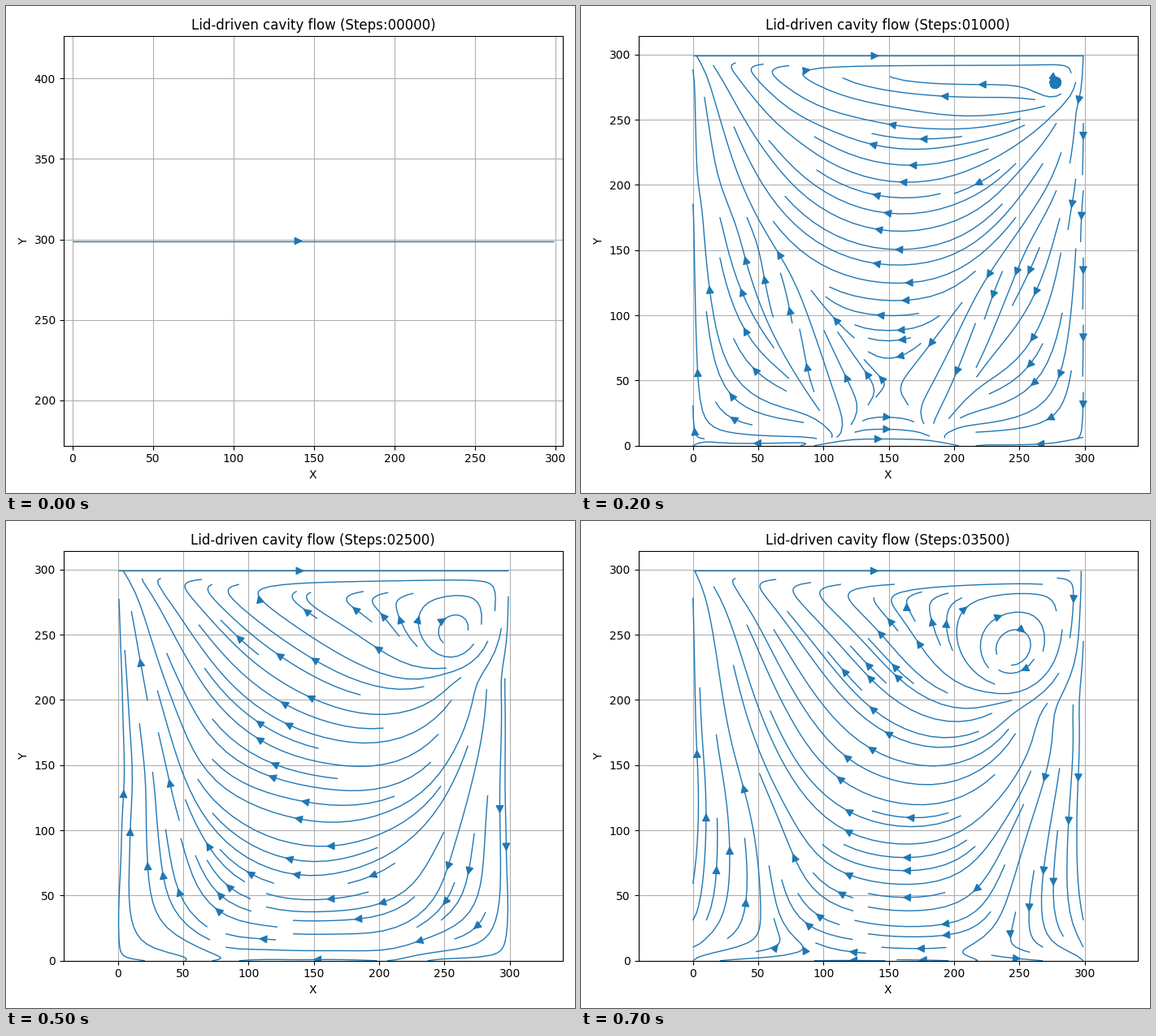
These frames come from a looping animation (700 px wide and 600 px high, 0.8 s). A matplotlib script:

```python
import numpy as np
import matplotlib.pyplot as plt
from matplotlib.animation import FuncAnimation

# Lattice Boltzmann (D2Q9) cavity, solved on a coarser grid than it is plotted
SIZE = 300
N = 240
LID_SPEED = 0.2
REYNOLDS = 2000
FRAMES = 8
STEPS_PER_FRAME = 500

CX = (0, 1, 0, -1, 0, 1, -1, -1, 1)
CY = (0, 0, 1, 0, -1, 1, 1, -1, -1)
W = (4 / 9,) + (1 / 9,) * 4 + (1 / 36,) * 4
OPPOSITE = (0, 3, 4, 1, 2, 7, 8, 5, 6)
OMEGA = 1 / (3 * LID_SPEED * N / REYNOLDS + 0.5)


def moments(f):
    rho = f.sum(axis=0)
    rising, falling = f[5] - f[7], f[8] - f[6]
    u = (f[1] - f[3] + rising + falling) / rho
    v = (f[2] - f[4] + rising - falling) / rho
    return rho, u, v


def collide(f):
    rho, u, v = moments(f)
    base = 1 - 1.5 * (u * u + v * v)
    post = f * (1 - OMEGA)
    rho *= OMEGA
    post[0] += W[0] * rho * base
    for i, along in ((1, u), (2, v), (5, u + v), (6, v - u)):
        cu = 3 * along
        weight = W[i] * rho
        even = weight * (base + 0.5 * cu * cu)
        odd = weight * cu
        post[i] += even + odd
        post[OPPOSITE[i]] += even - odd
    return post


def stream(post, f):
    f[0] = post[0]
    for i in range(1, 9):
        f[i] = np.roll(post[i], (CY[i], CX[i]), axis=(0, 1))
    # half-way bounce-back, with the lid dragging along x
    for i in (2, 5, 6):
        f[i, 0] = post[OPPOSITE[i], 0]
    for i in (4, 7, 8):
        f[i, -1] = post[OPPOSITE[i], -1] + 6 * W[i] * CX[i] * LID_SPEED
    for i in (1, 5, 8):
        f[i, :, 0] = post[OPPOSITE[i], :, 0]
    for i in (3, 6, 7):
        f[i, :, -1] = post[OPPOSITE[i], :, -1]


grid = np.arange(SIZE)
nodes = (np.arange(N) + 0.5) * SIZE / N - 0.5
resample = np.array([np.interp(grid, nodes, unit) for unit in np.eye(N)]).T


def simulate():
    """Yield the velocity field of every frame on the plotting grid."""
    f = np.empty((9, N, N), dtype=np.float32)
    for i in range(9):
        f[i] = W[i]
    u = v = np.zeros((N, N))
    for frame in range(FRAMES):
        if frame:
            for _ in range(STEPS_PER_FRAME * N // SIZE):
                stream(collide(f), f)
            _, u, v = moments(f)
        fine_u = resample @ u @ resample.T
        fine_v = resample @ v @ resample.T
        fine_u[-1], fine_v[-1] = LID_SPEED, 0
        yield fine_u, fine_v


fig, ax = plt.subplots(figsize=(7, 6), dpi=100)
ax.set_xlabel("X")
ax.set_ylabel("Y")
ax.grid(True)
title = ax.set_title("Lid-driven cavity flow (Steps:00000)")
ax.set_xlim(-41, 340)
ax.set_ylim(0, 314)
fig.tight_layout()
box = ax.get_window_extent()
ratio = box.width / box.height
middle = (SIZE - 1) / 2


def set_view(half_width, bottom):
    ax.set_xlim(middle - half_width, middle + half_width)
    ax.set_ylim(bottom, bottom + 2 * half_width / ratio)


groups = []
for u, v in simulate():
    known = len(ax.patches)
    flow = ax.streamplot(grid, grid, u, v, density=1, color="tab:blue",
                         linewidth=1, arrowsize=1.5)
    groups.append([flow.lines, *list(ax.patches)[known:]])


def update(frame):
    for i, group in enumerate(groups):
        for artist in group:
            artist.set_visible(i == frame)
    title.set_text(f"Lid-driven cavity flow (Steps:{frame * STEPS_PER_FRAME:05d})")
    if frame == 0:
        set_view(155, SIZE - 1 - 155 / ratio)
    else:
        set_view(157 * ratio, 0)
    return []


update(0)
anim = FuncAnimation(fig, update, frames=FRAMES, interval=100, repeat=True)
plt.show()
```
